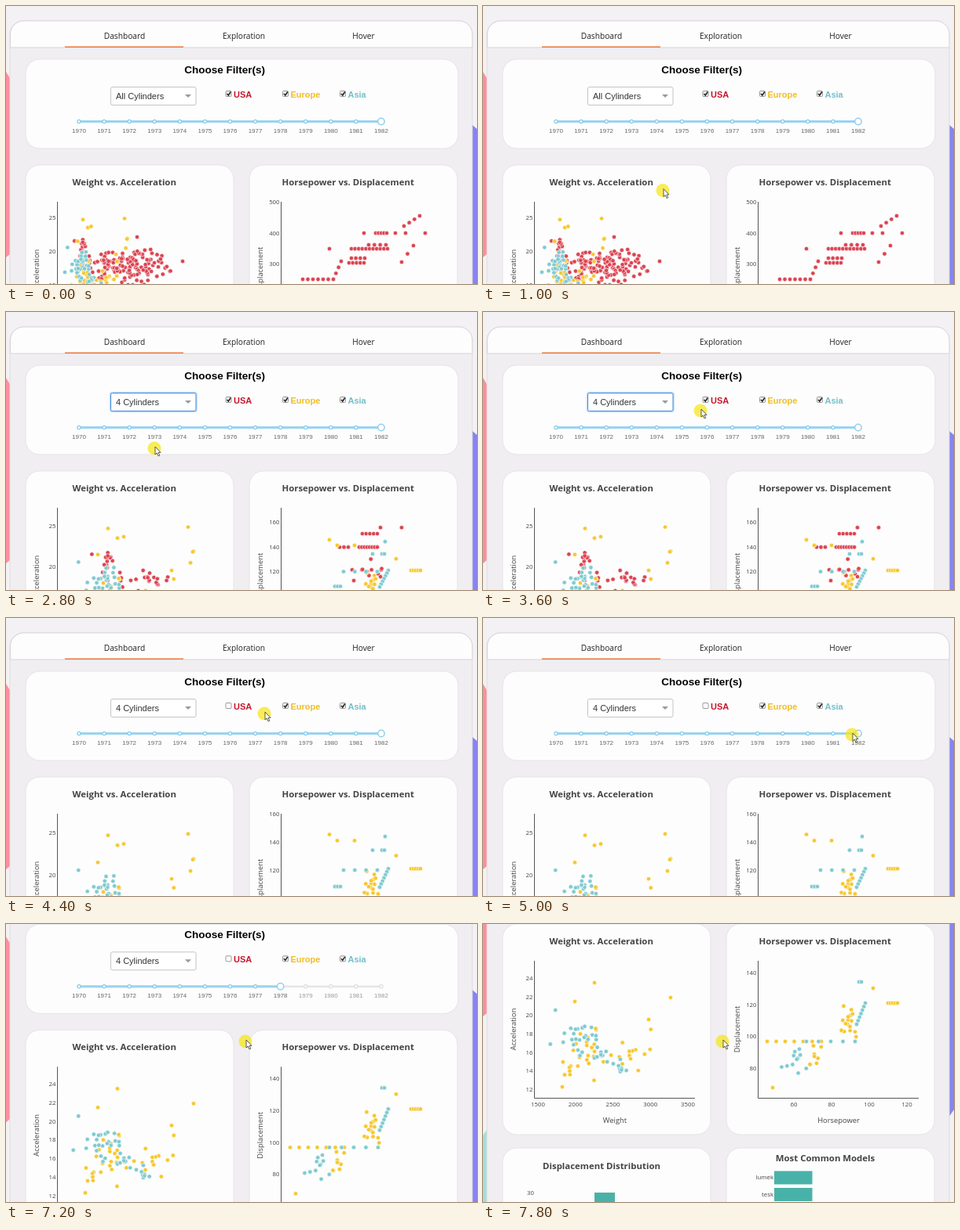
Recreate the animation shown at these times as an HTML page. Size 600 px wide and 355 px high, loop 8 s.

```html
<!DOCTYPE html>
<html lang="en">
<head>
<meta charset="utf-8">
<title>Car dashboard</title>
<style>
  html, body { margin: 0; width: 100%; height: 100%; overflow: hidden; background: #f3f1f3; }
  svg { display: block; width: 600px; height: 355px; }
  text { font: 7.8px "Open Sans", sans-serif; fill: #444; }
  .nav { font-size: 10.2px; fill: #222; }
  .title { font-size: 11.4px; font-weight: 700; }
  .axis { font-size: 9.4px; }
  .ui { font: 11px "Liberation Sans", Arial, sans-serif; fill: #333; }
  .year { font: 8px "Liberation Sans", Arial, sans-serif; fill: #666; }
  .heading { font: bold 13.5px "Liberation Sans", Arial, sans-serif; fill: #000; }
  .bold { font-weight: bold; fill: #111; }
</style>
</head>
<body>
<svg id="stage" viewBox="0 0 600 355"></svg>
<script>
const LOOP = 8000, STEP = 200;
const RED = '#dc4351', YELLOW = '#f7c72f', BLUE = '#80cad1', TEAL = '#49b2a8';
const OPTIONS = ['All Cylinders', ...[3, 4, 5, 6, 8].map(n => n + ' Cylinders')];

let seed = 11;
const random = () => (seed = seed * 16807 % 2147483647) / 2147483647;
const spread = () => random() + random() - 1;
const range = n => [...Array(n).keys()];

// Points scattered around a centre, within dx and dy, leaning along a slope.
const cloud = (n, x, y, dx, dy, slope = 0) => range(n).map(() => {
  const u = spread() * dx;
  return [x + u, y + u * slope + spread() * dy];
});
// Points evenly spaced along a segment; level unless y1 is given.
const line = (n, x0, y0, x1, y1 = y0) =>
  range(n).map(i => [x0 + (x1 - x0) * i / (n - 1), y0 + (y1 - y0) * i / (n - 1)]);

// Both data sets are in plot units; each view rescales them.
const weight = {
  usa: [...cloud(24, 170, 138, 45, 20), ...cloud(14, 127, 110, 18, 28)],
  europe: [[142, 75], [117, 99], [239, 94], [211, 122], [101, 208],
    ...cloud(24, 125, 162, 32, 45), ...cloud(16, 178, 172, 50, 38)],
  asia: [...cloud(24, 118, 145, 36, 30, .3), ...cloud(16, 158, 174, 30, 14, .5)],
  lateEurope: [[130, 61], [150, 73], [232, 59], [235, 111], [238, 95]],
  lateAsia: cloud(8, 128, 130, 20, 18)
};
const power = {
  usa: [...line(2, 477, 31, 504), ...line(5, 454, 41, 473), ...line(3, 425, 63, 436), ...line(8, 450, 63, 473),
    ...line(4, 441, 100, 478), ...cloud(8, 460, 105, 30, 30)],
  europe: [[369, 209], [497, 82], ...line(7, 362, 150, 431), ...line(5, 516, 101, 528),
    ...cloud(8, 423, 168, 14, 18), ...cloud(16, 463, 124, 20, 26)],
  asia: [...line(2, 479, 74, 482), ...line(5, 412, 150, 474), ...line(7, 487, 101, 476, 128),
    ...cloud(11, 397, 178, 26, 25)],
  lateEurope: [[412, 51], ...line(2, 422, 60, 444)],
  lateAsia: [[483, 54], [467, 74], ...line(4, 430, 103, 473), ...line(3, 419, 127, 426)]
};
// Six- and eight-cylinder cars, seen only in the first view.
const heavyWeight = [[225, 326], [167, 295], ...cloud(85, 162, 338, 56, 26), ...cloud(26, 172, 322, 42, 16)];
const heavyPower = [[412, 310], [456, 290], [534, 290],
  ...line(7, 378, 349, 417), ...line(4, 417, 349, 427, 326), ...line(5, 437, 328, 456), ...line(4, 440, 322, 457),
  ...line(11, 440, 310, 486), ...line(5, 471, 290, 485), ...line(2, 496, 290, 509), ...line(4, 462, 305, 484),
  ...line(4, 507, 281, 527, 268), ...line(3, 504, 327, 519, 306)];

const linear = (pivot, at, scale) => v => at + (v - pivot) * scale;
const same = x => x;
const shift = y => y + 203;
const wideX = linear(130, 98, .52);
const views = {
  all: { wx: wideX, wy: linear(57.15, 270, .726), wTicks: [25, 20, 15],
         py: linear(62, 393, .1955), pTicks: [500, 400, 300] },
  four: { wx: same, wy: linear(57.15, 273, .878), wTicks: [25, 20],
          py: linear(62, 299.5, .782), pTicks: [160, 140, 120] },
  abroad: { wx: same, wy: linear(57.15, 274, .911), wTicks: [25, 20],
            py: linear(62, 286, .875), pTicks: [160, 140, 120] },
  early: { wx: same, wy: shift, wTicks: [24, 22, 20, 18, 16, 14, 12],
           py: shift, pTicks: [140, 120, 100, 80] }
};

// [time, x, y] of the pointer tip
const pointerPath = [[600, 300, 355], [1400, 160, 112], [1800, 156, 106], [2400, 168, 184], [2600, 168, 184],
  [3600, 278, 124], [4200, 283, 111], [5000, 471, 147], [5200, 471, 147], [6200, 342, 151],
  [6400, 342, 151], [7000, 306, 148], [LOOP, 306, 148]];

function pointerAt(t) {
  const i = pointerPath.findIndex(k => k[0] > t);
  const [t0, x0, y0] = pointerPath[i - 1], [t1, x1, y1] = pointerPath[i];
  const p = (t - t0) / (t1 - t0);
  return [x0 + (x1 - x0) * p, y0 + (y1 - y0) * p];
}

const text = (x, y, s, cls = '', anchor = 'middle', extra = '') =>
  `<text x="${x}" y="${y}" class="${cls}" text-anchor="${anchor}" ${extra}>${s}</text>`;
const rect = (x, y, w, h, fill, extra = '') =>
  `<rect x="${x}" y="${y}" width="${w}" height="${h}" fill="${fill}" ${extra}/>`;
const path = (d, extra) => `<path d="${d}" ${extra}/>`;
const circle = (x, y, r, extra) => `<circle cx="${x}" cy="${y}" r="${r}" ${extra}/>`;
const card = (x, y, w, h) => rect(x, y, w, h, '#fdfdfd', 'rx="18" stroke="#e6e3e6"');

const dots = (points, color, fx = same, fy = same) => points.map(([x, y]) =>
  circle(fx(x), fy(y), 2.7, `fill="${color}" stroke="#fff" stroke-width=".6"`)).join('');

function series(data, state, fx, fy) {
  const late = state !== 'early', usa = state === 'all' || state === 'four';
  return (usa ? dots(data.usa, RED, fx, fy) : '') +
    dots(data.europe, YELLOW, fx, fy) + (late ? dots(data.lateEurope, YELLOW, fx, fy) : '') +
    dots(data.asia, BLUE, fx, fy) + (late ? dots(data.lateAsia, BLUE, fx, fy) : '');
}

function chartFrame(x, title, xName, yName, xTicks, yTicks) {
  return card(x, 203, 265, 269) + text(x + 125.7, 229, title, 'title') +
    path(`M${x + 40.5} 250V425.5H${x + 245}`, 'fill="none" stroke="#555"') +
    text(x + 143, 457, xName, 'axis') +
    text(0, 0, yName, 'axis', 'middle', `transform="translate(${x + 17} 337.5) rotate(-90)"`) +
    xTicks.map(([v, at]) => text(at, 436, v)).join('') +
    yTicks.map(([v, at]) => text(x + 38.5, at + 3, v, '', 'end')).join('');
}

function charts(state) {
  const v = views[state], all = state === 'all';
  const weightTicks = v.wTicks.map(n => [n, v.wy(69 + (24 - n) * 11.85)]);
  const powerTicks = v.pTicks.map(n => [n, v.py(62 + (140 - n) * 2.035)]);
  return chartFrame(25, 'Weight vs. Acceleration', 'Weight', 'Acceleration',
      range(5).map(i => [1500 + 500 * i, 70 + 47.75 * i]), weightTicks) +
    (all ? dots(heavyWeight, RED) : '') + series(weight, state, v.wx, v.wy) +
    chartFrame(310, 'Horsepower vs. Displacement', 'Horsepower', 'Displacement',
      range(4).map(i => [60 + 20 * i, 396 + 48 * i]), powerTicks) +
    (all ? dots(heavyPower, RED) : '') + series(power, state, same, v.py);
}

function checkbox(x, label, color, checked) {
  return rect(x + .5, 108.5, 7, 7, checked ? '#eee' : '#fff', 'rx="1" stroke="#999"') +
    (checked ? path(`M${x + 2} 112l1.8 2 3-4.5`, 'fill="none" stroke="#222" stroke-width="1.5"') : '') +
    text(x + 10.5, 116.5, label, 'ui bold', 'start', `style="fill:${color}"`);
}

function slider(value) {
  const at = i => 93 + i * 32.08, end = at(value);
  return rect(93, 146.2, 385, 2.6, '#e6e6e8') + rect(93, 146, end - 93, 3, '#9ad3ee') +
    range(13).map(i =>
      circle(at(i), 147.5, 2.1, `fill="#fff" stroke="${i <= value ? '#86cbec' : '#ddd'}" stroke-width="1.2"`) +
      text(at(i), 161.5, 1970 + i, 'year', 'middle', i > value ? 'style="fill:#999"' : '')).join('') +
    circle(end, 147.5, 4.2, 'fill="#fff" stroke="#92cfea" stroke-width="1.5"');
}

function selectBox(label, open, focus) {
  const arrow = open ? 'M228 117h8l-4-4z' : 'M228 113h8l-4 4z';
  return (focus ? rect(132.5, 102.5, 110.5, 25, 'none', 'rx="3" stroke="#cfe3fa" stroke-width="2"') : '') +
    rect(133.5, 103.5, 108.5, 23, '#fff', `rx="2" stroke="${focus ? '#3b86d8' : '#c4c4c4'}"`) +
    text(140, 119, label, 'ui', 'start', open ? 'style="fill:#555"' : '') +
    path(arrow, 'fill="#999"') + (open ? rect(140.5, 109, 1, 12, '#222') : '');
}

function optionList(hovered) {
  return rect(133.5, 126.5, 109, 134, '#fff', 'stroke="#c4c4c4"') +
    `<clipPath id="list"><rect x="134" y="127" width="108" height="133"/></clipPath><g clip-path="url(#list)">` +
    rect(134, 127 + 23.5 * hovered, 98, 23.5, '#e6f0fc') +
    OPTIONS.map((s, i) => text(139, 142.5 + 23.5 * i, s, i ? 'ui' : 'ui bold', 'start')).join('') +
    rect(232, 127, 10, 133, '#f1f1f1') + rect(232.5, 138, 9, 107, '#c1c1c1') +
    path('M234.5 134h4l-2-2.5z', 'fill="#999"') + path('M234.5 255h4l-2 2.5z', 'fill="#444"') + '</g>';
}

function lowerCards() {
  return card(25, 489, 265, 180) + text(151, 516, 'Displacement Distribution', 'title') +
    text(65, 549, 30, '', 'end') + rect(142, 546, 26, 60, TEAL) +
    card(310, 489, 265, 180) + text(436, 506, 'Most Common Models', 'title') +
    ['lumek', 'tesk'].map((s, i) => text(370, 529.5 + 21.5 * i, s, '', 'end') +
      rect(371, 518.5 + 21.5 * i, 48.5, 17, TEAL)).join('');
}

function backdrop() {
  return path('M0 84L6 94V316L0 321z', 'fill="#fb8f9d"') + path('M0 473L6 464V600H0z', 'fill="#a3dfd9"') +
    path('M593 151L600 157V440L593 450z', 'fill="#8783f1"') +
    rect(5, 19, 589, 700, '#f0eef0', 'rx="17" stroke="#dfdcdf"') +
    path('M5.5 53V36a17 17 0 0 1 17-17H577a17 17 0 0 1 17 17V53z', 'fill="#fdfdfd" stroke="#d8d5d8"') +
    rect(75, 51.5, 151, 1.5, '#ee7a40') +
    text(151, 42, 'Dashboard', 'nav') + text(303, 42, 'Exploration', 'nav') + text(455.5, 42, 'Hover', 'nav');
}

function pointer(t, open) {
  if (t < 600) return '';
  const [x, y] = pointerAt(t);
  const glow = circle(x - 1, y + 2, 8.5, 'fill="#f6e51f" opacity=".75"');
  if (open && y < 126)
    return glow + path(`M${x + 5} ${y + 3}h5m-2.5 0v11m-2.5 0h5`, 'fill="none" stroke="#222" stroke-width="1.2"');
  return glow + path(`M${x} ${y}v10l2.3-2 1.8 4 1.7-.8-1.8-3.8h3z`, 'fill="#fff" stroke="#333" stroke-width=".8"');
}

function scene(t) {
  const open = t >= 1600 && t < 2600;
  const state = t < 2800 ? 'all' : t < 4200 ? 'four' : t < 6600 ? 'abroad' : 'early';
  const dragged = Math.min(1, Math.max(0, (t - 5200) / 1000));
  const scroll = Math.max(0, t - 6900) * .2256;
  return `<g transform="translate(0 ${-scroll})">` + backdrop() +
    card(25, 68, 551, 114) + text(278.7, 86, 'Choose Filter(s)', 'heading') +
    selectBox(OPTIONS[t < 2600 ? 0 : 2], open, t >= 2600 && t < 4000) +
    checkbox(279.5, 'USA', '#c8142b', t < 4000) + checkbox(352, 'Europe', '#f0bd24', true) +
    checkbox(425, 'Asia', '#72bfc8', true) + slider(12 - Math.round(4 * dragged)) +
    charts(state) + lowerCards() + (open ? optionList(t < 2200 ? 0 : 2) : '') +
    '</g>' + pointer(t, open);
}

const stage = document.getElementById('stage');
const start = performance.now();
let shown = -1;
function draw() {
  const t = Math.floor((performance.now() - start) % LOOP / STEP) * STEP;
  if (t !== shown) stage.innerHTML = scene(shown = t);
  requestAnimationFrame(draw);
}
draw();
</script>
</body>
</html>
```
